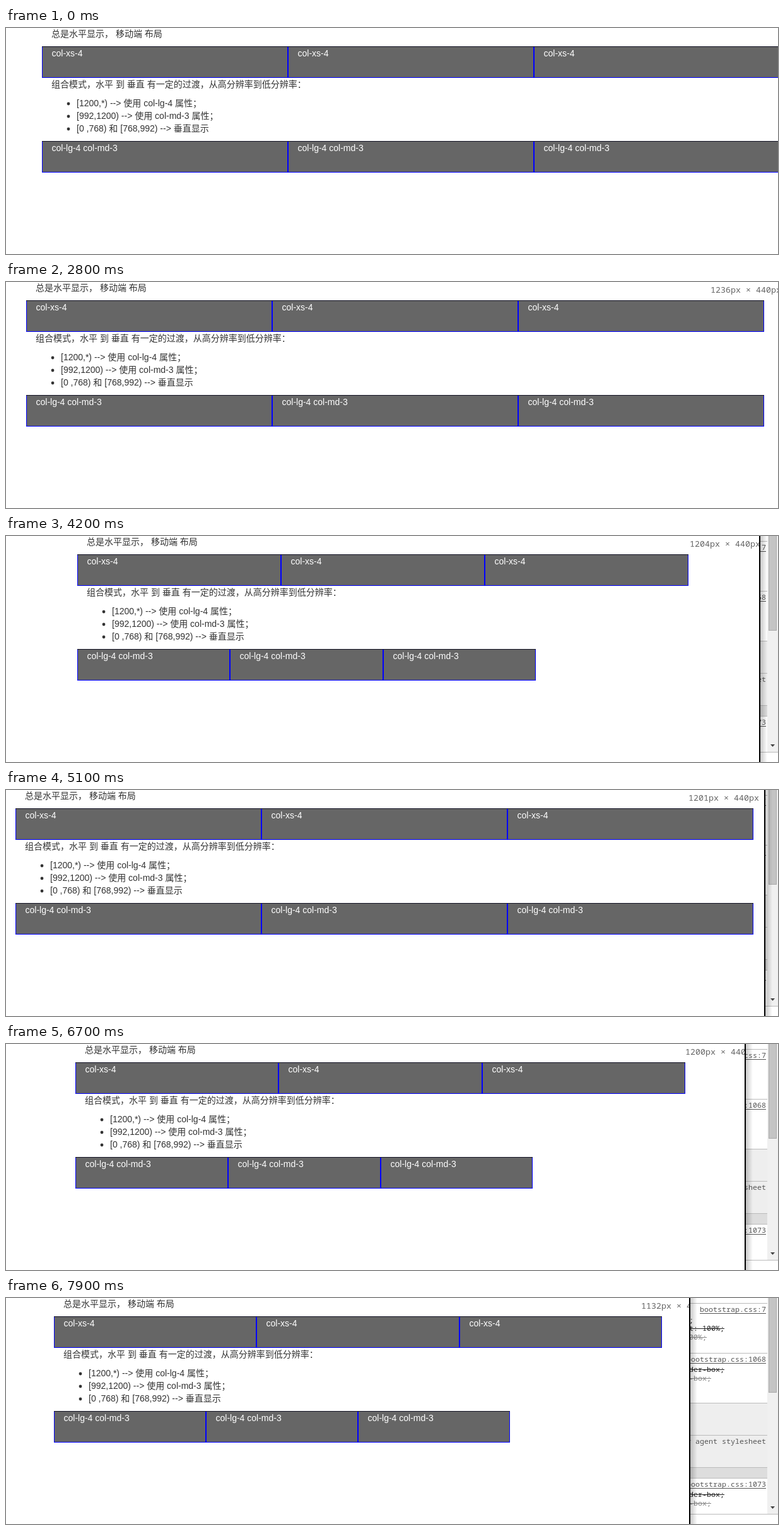
An HTML page with a canvas for the animation above (8000 ms loop, 1224 by 358 pixels).

```html
<!DOCTYPE html>
<html lang="zh-CN">
<head>
<meta charset="utf-8">
<style>
html, body { margin: 0; width: 100%; height: 100%; overflow: hidden; background: #fff; }
canvas { display: block; }
</style>
</head>
<body>
<canvas id="stage" width="1224" height="358"></canvas>
<script>
const ctx = document.getElementById('stage').getContext('2d');
const LOOP = 8000, STEP = 100;
const SANS = '14px "Liberation Sans", "Noto Sans CJK SC", "Noto Sans CJK", sans-serif';
const mono = size => size + 'px "Noto Sans Mono", monospace';

// time, container left, container width, width shown in the label, window edge
const KEYS = [
  [0, 57, 1170, 1284, 1285],
  [1400, 57, 1170, 1284, 1285],
  [1800, 50, 1170, 1270, 1271],
  [1900, 50, 1170, 1270, 1271],
  [2000, 48, 1169, 1270, 1265],
  [2800, 32, 1170, 1236, 1233],
  [3700, 24, 1170, 1219, 1210],
  [4100, 16, 1170, 1205, 1200],
  [4200, 113, 969, 1204, 1194],
  [4700, 112, 970, 1195, 1194],
  [4900, 114, 970, 1198, 1198],
  [5000, 15, 1170, 1200, 1201],
  [5100, 15, 1170, 1201, 1202],
  [5500, 15, 1170, 1200, 1201],
  [5900, 15, 1170, 1200, 1201],
  [6300, 14, 1168, 1200, 1198],
  [6400, 113, 969, 1200, 1192],
  [6700, 110, 967, 1200, 1171],
  [6800, 105, 967, 1185, 1170],
  [6900, 100, 970, 1170, 1170],
  [7000, 100, 970, 1170, 1170],
  [7400, 92, 967, 1160, 1144],
  [7900, 75.5, 964.5, 1132, 1083]
];

function poseAt(t) {
  const n = KEYS.findIndex(k => k[0] > t);
  if (n < 0) return KEYS[KEYS.length - 1];
  const a = KEYS[n - 1], b = KEYS[n], p = (t - a[0]) / (b[0] - a[0]);
  return a.map((v, i) => v + (b[i] - v) * p);
}

function rect(x, y, w, h, color) {
  ctx.fillStyle = color;
  ctx.fillRect(x, y, w, h);
}

function text(str, x, y, color, font = SANS, align = 'left') {
  ctx.font = font;
  ctx.fillStyle = color;
  ctx.textAlign = align;
  ctx.fillText(str, x, y);
}

function columns(label, left, colWidth, y, topColor) {
  for (let i = 0; i < 3; i++) {
    const x = Math.round(left + i * colWidth);
    const w = Math.round(left + (i + 1) * colWidth) - x;
    rect(x, y, w, 50, '#00f');
    rect(x, y, w, 1, topColor);
    rect(x + 1, y + 1, w - 2, 48, '#666');
    text(label, x + 15.5, y + 16, '#fff');
  }
}

function page(left, width, topColor) {
  const x = Math.round(left + 15);
  const wide = width > 1100;
  text('总是水平显示， 移动端 布局', x, 14, '#333');
  columns('col-xs-4', left, width / 3, 29, topColor);
  text('组合模式，水平 到 垂直 有一定的过渡，从高分辨率到低分辨率：', x, 94, '#333');
  ['[1200,*) --> 使用 col-lg-4 属性；',
   '[992,1200) --> 使用 col-md-3 属性；',
   '[0 ,768) 和 [768,992) --> 垂直显示'].forEach((line, i) => {
    const y = 124 + 20 * i;
    text(line, x + 40, y, '#333');
    ctx.beginPath();
    ctx.arc(x + 27, y - 4, 2.4, 0, 7);
    ctx.fill();
  });
  columns('col-lg-4 col-md-3', left, width / (wide ? 3 : 4), 179, topColor);
}

// Right-aligned code with an optional line at the given offset from the baseline
function code(str, right, y, color, lineAt) {
  text(str, right, y, color, mono(11.667), 'right');
  if (lineAt) rect(right - str.length * 7, y + lineAt, str.length * 7, 1, color);
}

function inspector(edge) {
  if (edge >= 1224) return;
  ctx.save();
  ctx.beginPath();
  ctx.rect(edge, 0, 1224 - edge, 358);
  ctx.clip();
  rect(edge, 0, 200, 358, '#fff');
  rect(edge, 167, 200, 102, '#eee');
  rect(edge, 269, 200, 16, '#ddd');
  for (const y of [8, 87, 166, 217, 268, 285]) rect(edge, y, 1207 - edge, 1, '#bbb');

  code('bootstrap.css:7', 1205, 22, '#555', 2);
  code('serif;', 1090, 39, '#222');
  code('-adjust: 100%;', 1139, 52, '#222', -4);
  code('adjust: 100%;', 1111, 66, '#888', -4);
  for (const y of [101, 299]) {
    code('bootstrap.css:' + (y < 200 ? 1068 : 1073), 1205, y, '#555', 2);
    code('border-box;', 1139, y + 16, '#222', -4);
    code('border-box;', 1118, y + 30, '#888', -4);
  }
  code('user agent stylesheet', 1205, 231, '#555');

  rect(1207, 0, 17, 342, '#f0f0f0');
  rect(1209, 0, 13, 150, '#aaa');
  rect(1210, 0, 11, 149, '#c4c4c4');
  ctx.fillStyle = '#444';
  ctx.beginPath();
  ctx.moveTo(1212, 330);
  ctx.lineTo(1219, 330);
  ctx.lineTo(1215.5, 334);
  ctx.fill();
  rect(edge, 342, 200, 1, '#bbb');

  const shade = ctx.createLinearGradient(edge, 0, edge + 13, 0);
  shade.addColorStop(0, 'rgba(0,0,0,.25)');
  shade.addColorStop(1, 'rgba(0,0,0,0)');
  rect(edge, 0, 13, 358, shade);
  rect(edge, 0, 2, 358, '#000');
  ctx.restore();
}

function draw(now) {
  const t = Math.floor(now % LOOP / STEP) * STEP;
  const [, left, width, shown, edge] = poseAt(t);
  rect(0, 0, 1224, 358, '#fff');
  page(left, width, t >= 1500 && t < 2400 ? '#00f' : '#112');
  if (t >= 1500) {
    const stretch = width / (width > 1100 ? 1170 : 970);
    const px = Math.round(shown);
    text(px + 'px × 440px', Math.round(shown * stretch - 119), 17, '#666', mono(13.333));
  }
  inspector(Math.round(edge));
}

const start = performance.now();
function tick() {
  draw(performance.now() - start);
  requestAnimationFrame(tick);
}
tick();
</script>
</body>
</html>
```
